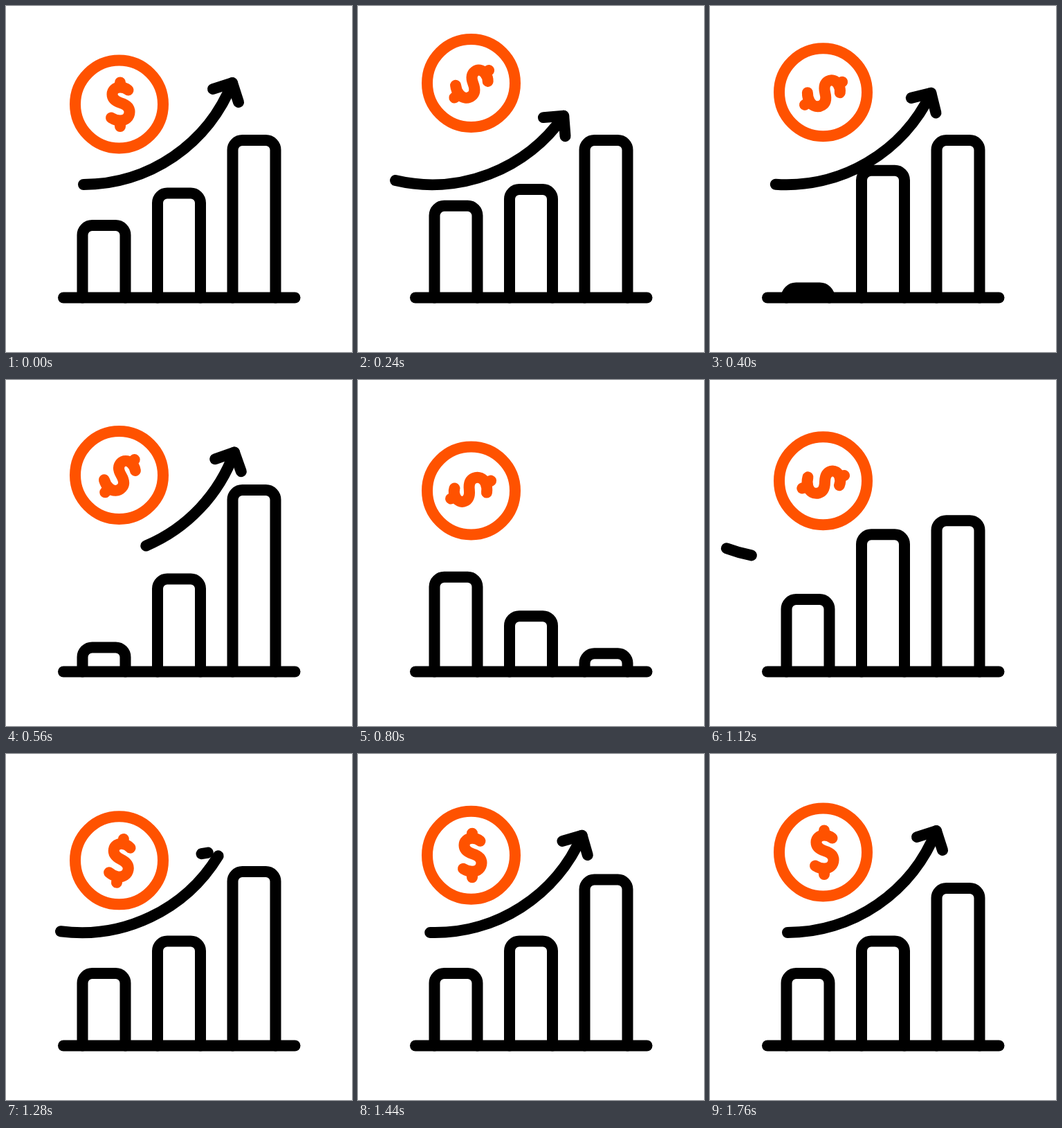
An HTML page that plays this animation: 500 by 500 pixels, repeating every 2 s.

```html
<!DOCTYPE html>
<html lang="en">
<head>
<meta charset="utf-8">
<title>Growth chart</title>
<style>
  html, body { margin: 0; width: 100%; height: 100%; overflow: hidden; background: #fff; }
  svg { display: block; width: 100%; height: 100%; }
  path, circle { fill: none; stroke-width: 16; stroke-linecap: round; stroke-linejoin: round; }
  .ink { stroke: #000; }
  .coin { stroke: #ff5200; }
</style>
</head>
<body>
<svg viewBox="0 0 500 500">
  <g class="ink">
    <path d="M83 421.5H417.5"/>
    <path class="bar"/>
    <path class="bar"/>
    <path class="bar"/>
    <g id="arrow">
      <path id="shaft" pathLength="100" d="M112 258A231.6 231.6 0 0 0 327 111"/>
      <path id="head" pathLength="100" d="M299 120L327 111L336 139"/>
    </g>
  </g>
  <g id="coin" class="coin">
    <circle r="63.5"/>
    <path id="sign" d="M1.5 -31.5V-25M1.5 23.5V32M13 -20.5C9.5 -23.5 6 -24.5 1.5 -24.5C-5.5 -24.5 -10 -20 -10 -14.5C-10 -8 -5.5 -4.5 2 -2C10 .5 15 4.5 15 11C15 18 9.5 23.5 1.5 23.5C-3.5 23.5 -7.5 22 -11.5 19.5"/>
  </g>
</svg>
<script>
const LOOP = 2000, STEP = 80;
const BASE = 421.5, WIDTH = 62, PITCH = 108.5, DELAY = 200;
const $ = id => document.getElementById(id);

// Eased progress from 0 to 100 between two times.
const ramp = (t, from, to) =>
  50 - 50 * Math.cos(Math.PI * Math.min(1, Math.max(0, (t - from) / (to - from))));

// Smooth curve through [time, value] keys that never overshoots them.
function curve(...keys) {
  const last = keys.length - 1;
  const rate = i => (keys[i + 1][1] - keys[i][1]) / (keys[i + 1][0] - keys[i][0]);
  const slopes = keys.map((_, i) => {
    if (i === 0 || i === last) return 0;
    const a = rate(i - 1), b = rate(i);
    return a * b > 0 ? 2 * a * b / (a + b) : 0;
  });
  return t => {
    if (t <= keys[0][0]) return keys[0][1];
    if (t >= keys[last][0]) return keys[last][1];
    const i = keys.findIndex(k => k[0] > t) - 1;
    const [t0, v0] = keys[i], [t1, v1] = keys[i + 1];
    const d = t1 - t0, u = (t - t0) / d, w = 1 - u;
    return w * w * ((1 + 2 * u) * v0 + u * d * slopes[i])
         + u * u * ((1 + 2 * w) * v1 - w * d * slopes[i + 1]);
  };
}

// Every bar stretches, collapses, springs past its height and settles.
function barHeight(rest) {
  const lift = rest + 35, spring = rest + 55;
  return curve([0, rest], [160, lift], [360, 0.72 * lift], [400, 0.1 * lift], [440, 0],
    [560, 0.22 * spring], [600, 0.39 * spring], [760, 0.835 * spring],
    [880, 0.89 * spring], [950, spring], [1080, rest]);
}

const barPaths = document.querySelectorAll('.bar');
const heights = [104.5, 151, 227.5].map(barHeight);

const coinY = curve([0, 142], [160, 102.5], [240, 111.5], [560, 137.5], [800, 160],
  [900, 115], [960, 126], [1260, 154], [1560, 142]);
const coinTurn = curve([0, 0], [320, 61], [560, 42], [800, -114], [960, -191.5],
  [1280, -351], [1440, -360]);
const swing = curve([0, 0], [160, 17.2], [240, 13.4], [560, -1.7], [1120, 20.6],
  [1280, 7.6], [1560, 0]);

function barPath(i, t) {
  const h = heights[i](t - i * DELAY), r = Math.max(0, Math.min(14, h)), side = WIDTH - 2 * r;
  return `M${110.5 + i * PITCH} ${BASE}v${r - h}a${r} ${r} 0 0 1 ${r} ${-r}h${side}a${r} ${r} 0 0 1 ${r} ${r}V${BASE}`;
}

function trim(path, from, to) {
  path.style.display = to - from < 0.5 ? 'none' : '';
  path.setAttribute('stroke-dasharray', to - from >= 100 ? 'none' : `${to - from} 300`);
  path.setAttribute('stroke-dashoffset', -from);
}

function draw(t) {
  barPaths.forEach((path, i) => path.setAttribute('d', barPath(i, t)));
  $('coin').setAttribute('transform', `translate(163.5 ${coinY(t)})`);
  $('sign').setAttribute('transform', `rotate(${coinTurn(t)})`);
  $('arrow').setAttribute('transform', `rotate(${swing(t)} 108.5 8.2)`);
  if (t < 1000) {
    trim($('shaft'), ramp(t, 440, 760), 100);
    trim($('head'), ramp(t, 600, 740), 100);
  } else {
    trim($('shaft'), 0, ramp(t, 1060, 1310));
    trim($('head'), 0, ramp(t, 1230, 1420));
  }
}

const start = performance.now();
function tick() {
  const t = (performance.now() - start) % LOOP;
  draw(Math.floor(t / STEP) * STEP);
  requestAnimationFrame(tick);
}
tick();
</script>
</body>
</html>
```
